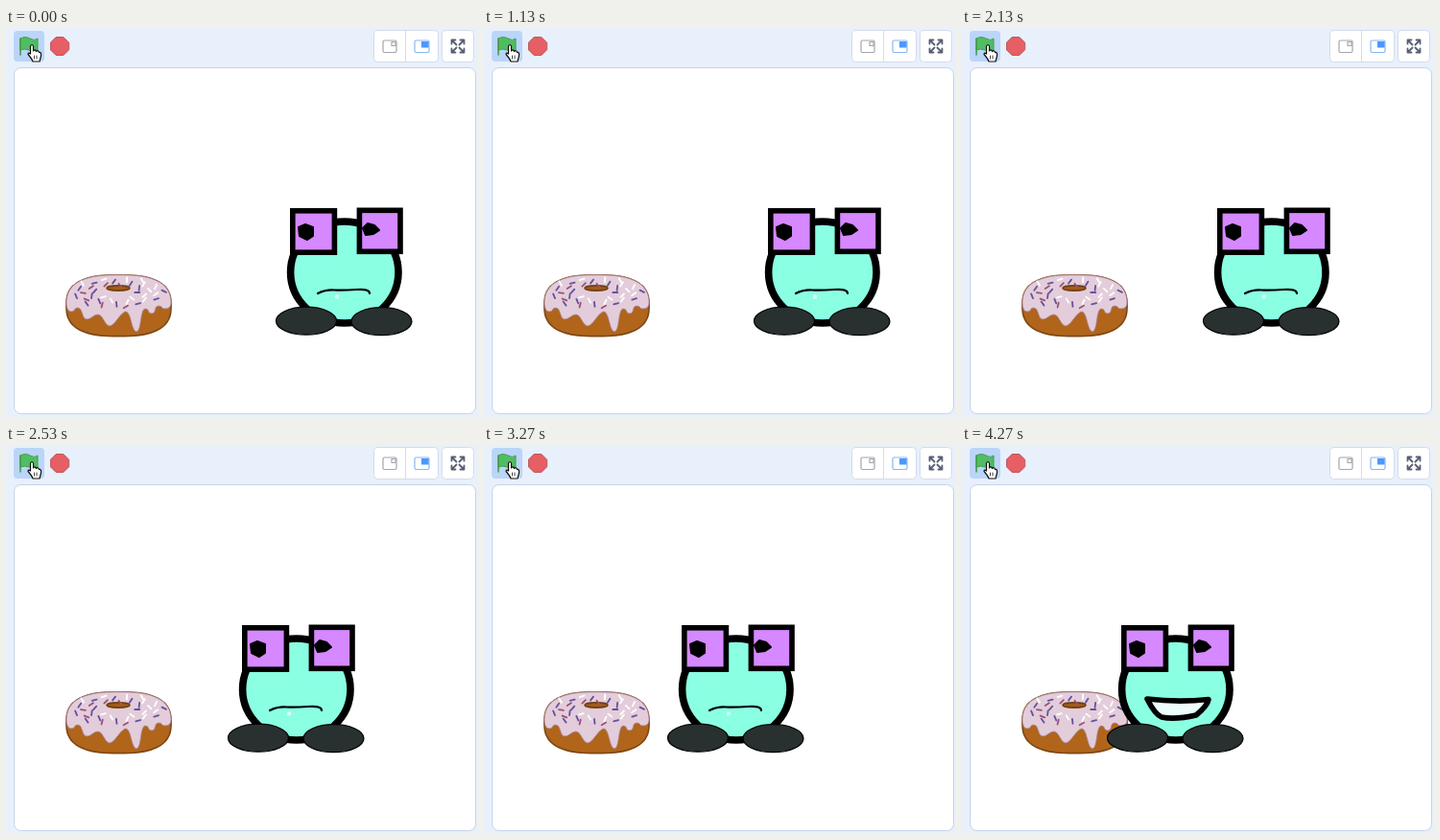
These frames come from a looping animation (492 by 406 pixels, 4.39 s). An HTML page:

```html
<!DOCTYPE html>
<html lang="en">
<head>
<meta charset="utf-8">
<title>Donut walk</title>
<style>
  html, body { margin: 0; width: 100%; height: 100%; overflow: hidden; background: #e8f0fc; }
  svg { display: block; width: 492px; height: 406px; }
</style>
</head>
<body>
<svg viewBox="0 0 492 406" stroke-linejoin="round" stroke-linecap="round">
  <rect x="8.5" y="41.5" width="481" height="361" rx="7" fill="#fff" stroke="#c5d3e9"/>

  <!-- toolbar -->
  <rect x="8" y="3" width="32" height="32" rx="4" fill="#bad5f8"/>
  <path d="M15 11Q20 8 25 11T33 11V23Q29 25 24 23T15 23Z" fill="#50bd62" stroke="#459c50"/>
  <path d="M15 11V28" stroke="#459c50" stroke-width="1.6"/>
  <path id="stop" fill="#e65f64" stroke="#b95559"/>
  <g fill="#fff" stroke="#d4dce9">
    <rect x="383.5" y="2.5" width="67" height="33" rx="4"/>
    <path d="M416.5 3V35"/>
    <rect x="454.5" y="2.5" width="33" height="33" rx="4"/>
  </g>
  <g fill="none" stroke="#a3a6ad" stroke-width="1.2">
    <rect x="393" y="13" width="14" height="12.5" rx="1.5"/>
    <rect x="402" y="14.5" width="4" height="4"/>
  </g>
  <rect x="426" y="13" width="15" height="12.5" rx="1.5" fill="#fff" stroke="#86b8f5" stroke-width="1.2"/>
  <rect x="433" y="14" width="7.500" height="6.500" fill="#4c97ff"/>
  <g id="arrows" fill="none" stroke="#575e75" stroke-width="1.8"></g>

  <!-- donut -->
  <path id="dough" fill="#b0651a" stroke="#7d4716" stroke-width="1.6"/>
  <path id="icing" fill="#e3cddb" stroke="#a98295" stroke-width=".8"/>
  <ellipse cx="117" cy="271.5" rx="12" ry="2.6" fill="#a35c17" stroke="#6f3f12" stroke-width="1.6"/>
  <g id="sprinkles" stroke-width="1.8"></g>

  <!-- creature -->
  <g id="creature" stroke="#000">
    <ellipse cx="352.8" cy="255" rx="56.2" ry="53" fill="#8affe2" stroke-width="7.6"/>
    <g fill="#d588ff" stroke-width="5.6" stroke-linejoin="miter">
      <rect x="298.8" y="190.8" width="43.6" height="43.4"/>
      <rect x="368.4" y="190.3" width="42.6" height="43"/>
    </g>
    <path stroke-width="2" d="M305 208L312 205L320 208V217L314 221L306 217Z"/>
    <path stroke-width="2" d="M372 209L377 204L384 206L389 211L383 215L375 216Z"/>
    <g id="frown">
      <path d="M325 277Q333 273 342 273.5T365 273T379 277" fill="none" stroke-width="2.2"/>
      <circle cx="345" cy="280.5" r="2.2" fill="#d5fff5" stroke="none"/>
    </g>
    <path id="smile" d="M323 265Q355 269 387 265.500Q386 272 374 282Q352 287 338 284Q331 281 323 265Z" fill="#edfffa" stroke-width="5.6"/>
    <g fill="#293030" stroke-width="1.2">
      <ellipse cx="313" cy="305.7" rx="31.5" ry="14.5"/>
      <ellipse cx="391.5" cy="306.2" rx="31.5" ry="14.5"/>
    </g>
  </g>

  <!-- pointer -->
  <g stroke="#111" stroke-width="1.2">
    <path d="M25.5 27V19Q27 16 28.500 19V24Q30 21.500 31.500 24.500Q33.500 22.500 34.500 25.500Q37 25 36.500 29L35 35H28Q27 32 23 27.500Q23 25 25.500 27Z" fill="#fff"/>
    <path d="M29.500 29V32M32 29V32" stroke-width=".8"/>
  </g>
</svg>
<script>
  const $ = id => document.getElementById(id);
  const range = n => [...Array(n).keys()];

  // closed curve through the midpoints of neighbouring points
  function smooth(points) {
    const mids = points.map(([x, y], i) => {
      const [nx, ny] = points[(i + 1) % points.length];
      return [(x + nx) / 2, (y + ny) / 2];
    });
    return `M${mids.at(-1)}` + points.map((p, i) => `Q${p} ${mids[i]}`).join("") + "Z";
  }

  // point on the donut's rounded outline
  function rim(a) {
    const bend = v => Math.sign(v) * Math.abs(v) ** 0.75;
    return [117.5 + 54.7 * bend(Math.cos(a)), 289.7 + 32 * bend(Math.sin(a))];
  }

  $("dough").setAttribute("d", smooth(range(48).map(i => rim(i * Math.PI / 24))));

  // lower edge of the icing: drip tips and the gaps between them
  const drips = [[166, 293], [159, 290], [152, 298], [145, 293], [136, 317], [125, 296],
                 [108, 311], [96, 299], [84, 304], [75, 292], [68, 296]];
  $("icing").setAttribute("d", smooth([
    ...range(25).map(i => rim(Math.PI * (1 + i / 24))),
    ...drips.flatMap(([x, y]) => [[x + 3, y], [x - 3, y]])
  ]));

  let seed = 7;
  const random = () => (seed = seed * 16807 % 2147483647) / 2147483647;
  const colors = ["#67509d", "#fff", "#9b5273", "#fff", "#67509d"];
  $("sprinkles").innerHTML = range(36).map(i => {
    const r = Math.sqrt((i + 7) / 43), a = i * 2.4;
    const x = 117 + 49 * r * Math.cos(a), y = 276 + 16 * r * Math.sin(a);
    return `<path d="M-2.500 0H2.500" stroke="${colors[i % 5]}"
      transform="translate(${x} ${y}) rotate(${random() * 180})"/>`;
  }).join("");

  $("arrows").innerHTML = range(4).map(i =>
    `<path d="M1.500 1.500L6 6M2.500 6.500H6.500V2.500" transform="translate(471 19) rotate(${i * 90})"/>`).join("");

  $("stop").setAttribute("d", "M" + range(8).map(i => {
    const a = (i + 0.5) * Math.PI / 4;
    return [56 + 10.2 * Math.cos(a), 19 + 10.2 * Math.sin(a)];
  }).join("L") + "Z");

  const LOOP = 4390, START = 1740, STEP = 180, STEPS = 13, HAPPY = 3720;

  function draw(now) {
    const t = now % LOOP;
    const steps = Math.max(0, Math.min(STEPS, Math.floor((t - START) / STEP) + 1));
    const happy = t >= HAPPY;
    $("creature").setAttribute("transform", `translate(${-10 * steps} 0)`);
    $("smile").style.display = happy ? "" : "none";
    $("frown").style.display = happy ? "none" : "";
  }

  const begin = performance.now();
  function tick() {
    draw(performance.now() - begin);
    requestAnimationFrame(tick);
  }
  tick();
</script>
</body>
</html>
```
